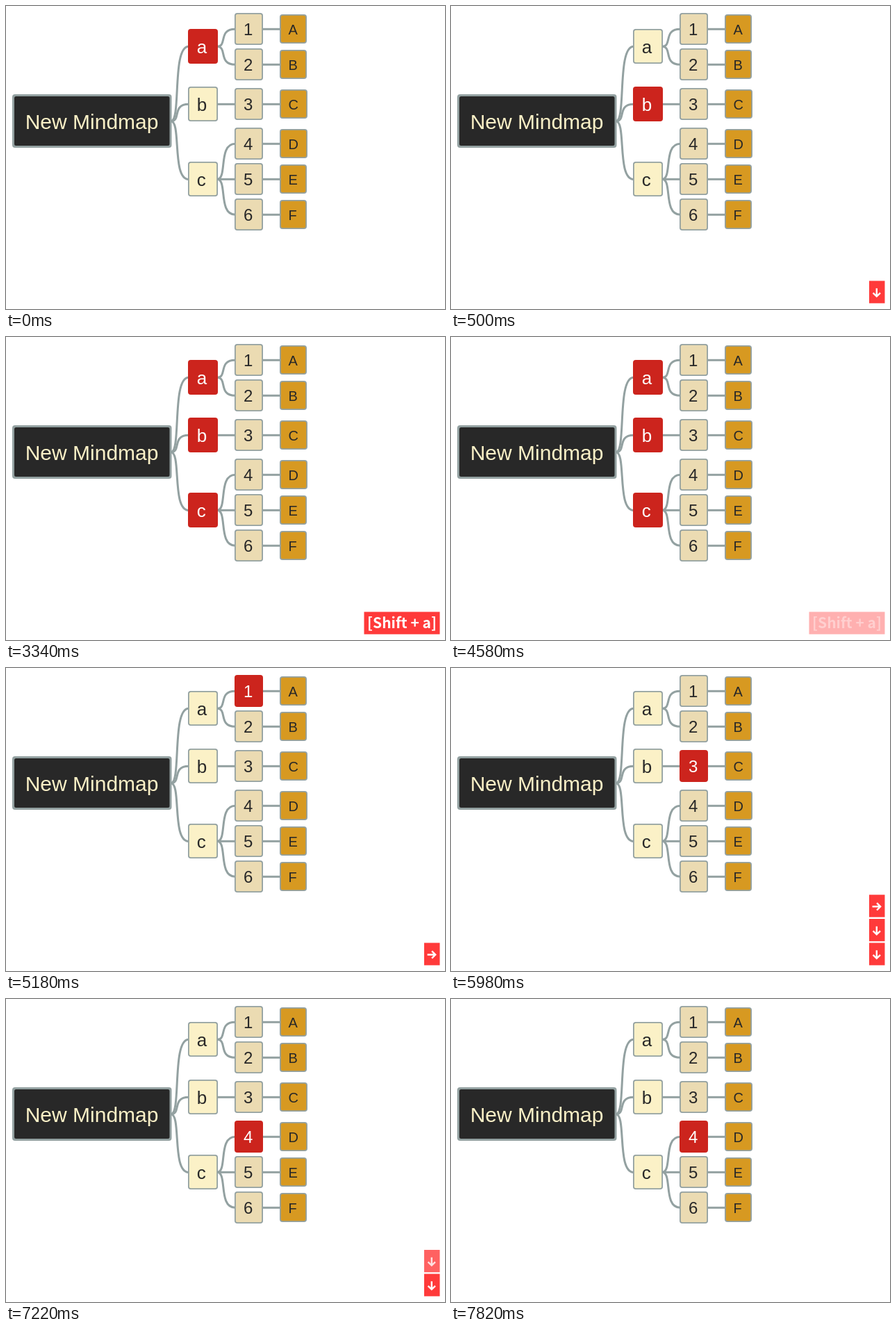
An HTML page with a canvas for the animation above (8 s loop, 632 by 436 pixels).

```html
<!DOCTYPE html>
<html lang="en">
<head>
<meta charset="utf-8">
<title>Mind map keys</title>
<style>
  html, body { margin: 0; width: 100%; height: 100%; overflow: hidden; background: #fff; }
  canvas { display: block; width: 632px; height: 436px; }
</style>
</head>
<body>
<canvas id="stage" width="632" height="436"></canvas>
<script>
const ctx = document.getElementById('stage').getContext('2d');
const LOOP = 8000;
const EDGE = '#93a1a1';
const RED = '#cc241d';
const SANS = '"Liberation Sans", Arial, sans-serif';
const KEY_FONT = 'bold 21px "Noto Sans CJK JP", "Noto Sans CJK SC", "Noto Sans CJK", "Noto Sans", sans-serif';

// Box style per depth; text offsets are from the box corner.
const LEVELS = [
  { x: 9, w: 229.5, h: 77, size: 30, tx: 18.7, ty: 50, fill: '#282828', ink: '#fbf1c7', border: 3 },
  { x: 262, w: 43, h: 50, size: 26, tx: 12.8, ty: 35, fill: '#fbf1c7', ink: '#282828', border: 1.8 },
  { x: 329, w: 41, h: 46, size: 24, tx: 13, ty: 32, fill: '#ebdbb2', ink: '#282828', border: 1.8 },
  { x: 394, w: 39, h: 42, size: 20, tx: 12.6, ty: 29, fill: '#d79921', ink: '#282828', border: 1.8 }
];

const node = (text, level, y, kids = []) => ({ text, level, y, kids });
const pair = (digit, letter, y) => node(digit, 2, y, [node(letter, 3, y + 2)]);
const root = node('New Mindmap', 0, 127, [
  node('a', 1, 33, [pair('1', 'A', 10), pair('2', 'B', 61)]),
  node('b', 1, 116, [pair('3', 'C', 118)]),
  node('c', 1, 224, [pair('4', 'D', 175), pair('5', 'E', 226), pair('6', 'F', 277)])
]);

const SELECTIONS = [[0, 'a'], [500, 'b'], [3340, 'abc'], [5180, '1'], [5780, '2'], [5980, '3'], [6420, '4']];

// Each key dims at `dim` and disappears 200 ms later.
const KEYS = [
  { label: 'down', start: 500, dim: 1740, alpha: 0.6 },
  { label: '[Shift + a]', start: 3340, dim: 4580, alpha: 0.4 },
  { label: 'right', start: 4980, dim: 6220, alpha: 0.6 },
  { label: 'down', start: 5780, dim: 7020, alpha: 0.6 },
  { label: 'down', start: 5980, dim: 7220, alpha: 0.8 },
  { label: 'down', start: 6420, dim: 7620, alpha: 0.4 }
];
const SLOTS = [395.5, 361, 326.3];

const midY = n => n.y + LEVELS[n.level].h / 2 + 0.3;

function roundRect(x, y, w, h, r) {
  ctx.beginPath();
  ctx.roundRect(x, y, w, h, r);
}

function drawEdge(from, to) {
  const p = LEVELS[from.level];
  const x1 = p.x + p.w, x2 = LEVELS[to.level].x + 1;
  const y1 = midY(from), y2 = midY(to);
  ctx.beginPath();
  ctx.moveTo(x1 - 1, y1);
  ctx.bezierCurveTo(x1 + 14, y1, x1, y2, x2, y2);
  ctx.strokeStyle = EDGE;
  ctx.lineWidth = 3;
  ctx.stroke();
}

function drawNode(n, selected) {
  const s = LEVELS[n.level];
  const on = selected.includes(n.text);
  const w = s.w + ('CD'.includes(n.text) ? 1 : 0);
  n.kids.forEach(kid => drawEdge(n, kid));

  roundRect(s.x, n.y, w, s.h, 4);
  ctx.fillStyle = on ? RED : EDGE;
  ctx.fill();
  if (!on) {
    const b = s.border;
    roundRect(s.x + b, n.y + b, w - 2 * b, s.h - 2 * b, 2.5);
    ctx.fillStyle = s.fill;
    ctx.fill();
  }

  ctx.font = `${s.size}px ${SANS}`;
  ctx.textAlign = 'left';
  ctx.fillStyle = on ? '#fff' : s.ink;
  ctx.fillText(n.text, s.x + s.tx, n.y + s.ty);
  n.kids.forEach(kid => drawNode(kid, selected));
}

function drawArrow(x, y, turn) {
  ctx.save();
  ctx.translate(x, y);
  ctx.rotate(turn);
  ctx.beginPath();
  ctx.moveTo(-6.2, 0);
  ctx.lineTo(5, 0);
  ctx.moveTo(0.3, -5.2);
  ctx.lineTo(5.4, 0);
  ctx.lineTo(0.3, 5.2);
  ctx.strokeStyle = '#fff';
  ctx.lineWidth = 2.4;
  ctx.stroke();
  ctx.restore();
}

function drawKey(key, y, t) {
  const wide = key.label.startsWith('[');
  const x = wide ? 515.5 : 602;
  ctx.globalAlpha = t < key.dim ? 1 : key.alpha;
  ctx.fillStyle = '#ff3a3a';
  ctx.fillRect(x, y, 624.5 - x, 32.2);
  if (wide) {
    ctx.font = KEY_FONT;
    ctx.textAlign = 'center';
    ctx.fillStyle = '#fff';
    ctx.fillText(key.label, 570, y + 23.5);
  } else {
    drawArrow(612.8, y + 17, key.label === 'down' ? Math.PI / 2 : 0);
  }
  ctx.globalAlpha = 1;
}

function draw(t) {
  ctx.fillStyle = '#fff';
  ctx.fillRect(0, 0, 632, 436);
  const selected = SELECTIONS.filter(([start]) => start <= t).pop()[1];
  drawNode(root, selected);

  // The newest key sits lowest; older ones stack above it.
  KEYS.filter(k => t >= k.start && t < k.dim + 200)
    .reverse()
    .forEach((k, i) => drawKey(k, SLOTS[i], t));
}

const began = performance.now();
function tick() {
  draw((performance.now() - began) % LOOP);
  requestAnimationFrame(tick);
}
tick();
</script>
</body>
</html>
```
